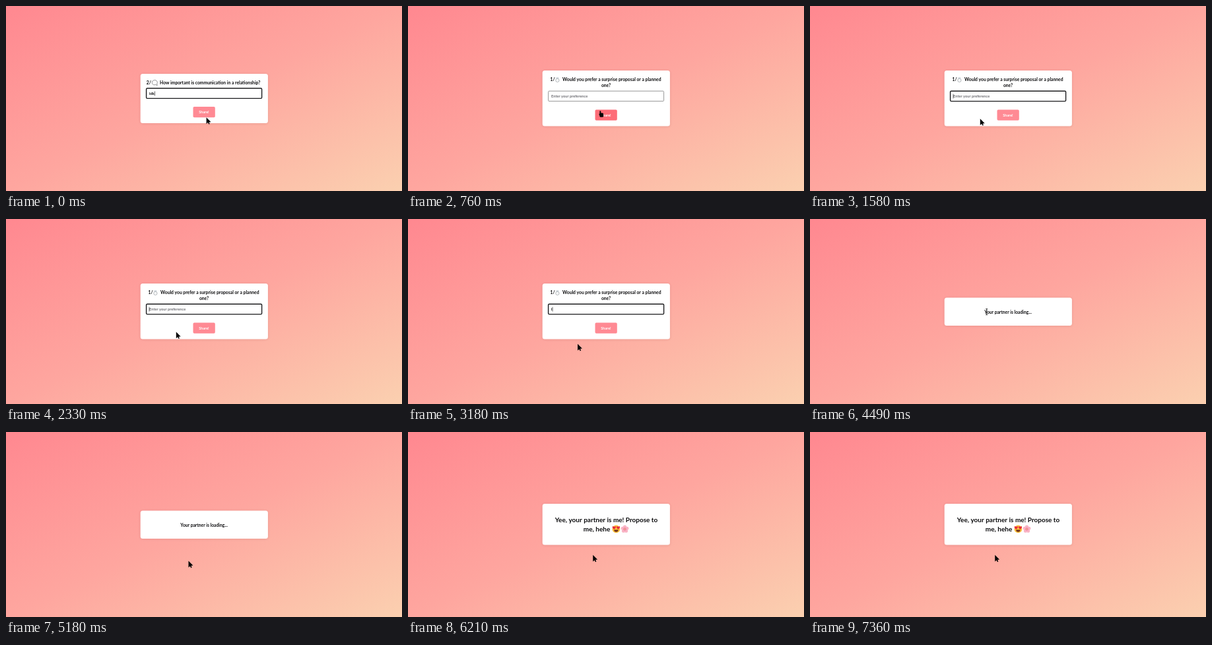
These frames come from a looping animation (600x281 px, 7.39 s). An HTML page with a canvas:

```html
<!DOCTYPE html>
<html lang="en">
<head>
<meta charset="utf-8">
<title>Partner quiz</title>
<style>
html, body { margin: 0; width: 100%; height: 100%; overflow: hidden; background: #ffa69f; }
canvas { display: block; width: 600px; height: 281px; }
</style>
</head>
<body>
<canvas id="stage"></canvas>
<script>
const W = 600, H = 281, LOOP = 7390;
const canvas = document.getElementById('stage');
const ctx = canvas.getContext('2d');
const scale = window.devicePixelRatio || 1;
canvas.width = W * scale;
canvas.height = H * scale;

const INK = '#0c0c0e';
const FIELD = { x: 212.6, w: 175 };
const BUTTON = { x: 283.5, w: 33.3 };

// Screens by start time
const screens = [
  { at: 0, top: 103, bottom: 178, draw: questionTwo, field: 125, button: 153 },
  { at: 400, top: 98, bottom: 182.5, draw: questionOne, field: 129.2, button: 157.6 },
  { at: 4220, top: 119.5, bottom: 162, draw: loading, text: [263, 136.5, 75, 9] },
  { at: 6150, top: 109, bottom: 171.6, draw: answer }
];

// Pointer stops: time, x, y
const stops = [
  [0, 303.6, 169.2], [60, 303.6, 169], [300, 292, 161], [760, 291.5, 159.6],
  [800, 291.5, 159.6], [1080, 256, 138], [1200, 256, 138], [1530, 257.8, 171.2],
  [2330, 257.8, 171.4], [2900, 257, 189.8], [3640, 257, 189.8], [4080, 290.6, 172.6],
  [4230, 290.6, 172.6], [4490, 267.7, 141], [4720, 267.7, 141], [5180, 276.5, 195.8],
  [5810, 276.5, 195.8], [5880, 280.2, 186.8], [LOOP, 280.2, 186.8]
];

function pointerAt(t) {
  const i = Math.max(1, stops.findIndex(s => s[0] > t));
  const [t0, x0, y0] = stops[i - 1], [t1, x1, y1] = stops[i];
  const p = (t - t0) / (t1 - t0), e = p * p * (3 - 2 * p);
  return { x: x0 + (x1 - x0) * e, y: y0 + (y1 - y0) * e };
}

const inside = (p, x, y, w, h) => p.x >= x && p.x <= x + w && p.y >= y && p.y <= y + h;

function box(x, y, w, h, r) {
  ctx.beginPath();
  ctx.roundRect(x, y, w, h, r);
}

function disc(x, y, rx, color, ry = rx) {
  ctx.fillStyle = color;
  ctx.beginPath();
  ctx.ellipse(x, y, rx, ry, 0, 0, Math.PI * 2);
  ctx.fill();
}

function label(str, x, y, size, align = 'center', color = INK) {
  ctx.font = `bold ${size}px Lato, "Open Sans", sans-serif`;
  ctx.textAlign = align;
  ctx.fillStyle = color;
  ctx.fillText(str, x, y);
  return ctx.measureText(str).width;
}

function backdrop() {
  // Gradient line perpendicular to the rising diagonal
  const k = W * H / (W * W + H * H), dx = H * k, dy = W * k;
  const g = ctx.createLinearGradient(W / 2 - dx, H / 2 - dy, W / 2 + dx, H / 2 + dy);
  g.addColorStop(0, '#ff8890');
  g.addColorStop(0.5, '#fea69f');
  g.addColorStop(1, '#fbd0b0');
  ctx.fillStyle = g;
  ctx.fillRect(0, 0, W, H);
}

function card(s) {
  ctx.save();
  ctx.shadowColor = 'rgba(120, 40, 40, 0.16)';
  ctx.shadowBlur = 4 * scale;
  ctx.shadowOffsetY = 0.6 * scale;
  ctx.fillStyle = '#fff';
  box(203.7, s.top, 193.2, s.bottom - s.top, 3.5);
  ctx.fill();
  ctx.restore();
}

function field(y, text, focused, caretOn) {
  box(FIELD.x, y, FIELD.w, 15.4, 1.4);
  ctx.fillStyle = '#fff';
  ctx.fill();
  ctx.lineWidth = focused ? 1.4 : 0.9;
  ctx.strokeStyle = focused ? '#1c1c1e' : '#8c8c8c';
  ctx.stroke();
  const shown = text || 'Enter your preference';
  const width = label(shown, 217, y + 9.8, 5.7, 'left', text ? INK : '#6f6f74');
  if (focused && caretOn) {
    ctx.fillStyle = INK;
    ctx.fillRect(text ? 217.3 + width : 216.7, y + 4.5, 0.6, 6.8);
  }
}

function button(y, hover) {
  ctx.fillStyle = hover ? '#fd6d78' : '#ff8a94';
  box(BUTTON.x, y, BUTTON.w, 16.2, 1.8);
  ctx.fill();
  label('Share!', 300, y + 10.1, 5.5, 'center', '#fff');
}

function bubble(x, y) {
  ctx.beginPath();
  ctx.ellipse(x, y, 4.1, 3.5, 0, 1.2, Math.PI * 2 + 0.55);
  ctx.lineTo(x + 4, y + 4.4);
  ctx.closePath();
  ctx.fillStyle = '#fff';
  ctx.fill();
  ctx.strokeStyle = '#4c4c50';
  ctx.lineWidth = 0.6;
  ctx.stroke();
}

function ring(x, y) {
  ctx.strokeStyle = '#a9adb2';
  ctx.lineWidth = 0.9;
  ctx.beginPath();
  ctx.arc(x, y + 1.2, 2.6, 0, Math.PI * 2);
  ctx.stroke();
  ctx.beginPath();
  ctx.moveTo(x - 1.7, y - 3.2);
  ctx.lineTo(x + 1.7, y - 3.2);
  ctx.lineTo(x + 2.1, y - 2.3);
  ctx.lineTo(x, y - 0.5);
  ctx.lineTo(x - 2.1, y - 2.3);
  ctx.closePath();
  ctx.fillStyle = '#c3ccd2';
  ctx.fill();
}

function heart(x, y, r) {
  ctx.fillStyle = '#e8283f';
  ctx.beginPath();
  ctx.moveTo(x, y + r);
  ctx.bezierCurveTo(x - r * 2.1, y - r * 0.4, x - r * 0.8, y - r * 1.7, x, y - r * 0.5);
  ctx.bezierCurveTo(x + r * 0.8, y - r * 1.7, x + r * 2.1, y - r * 0.4, x, y + r);
  ctx.fill();
}

function loveFace(x, y) {
  disc(x, y, 5.9, '#fdc23a');
  ctx.fillStyle = '#70331c';
  ctx.beginPath();
  ctx.arc(x, y + 1.2, 3.2, 0, Math.PI);
  ctx.fill();
  heart(x - 3.1, y - 1.9, 2.3);
  heart(x + 3.1, y - 1.9, 2.3);
}

function blossom(x, y) {
  for (let i = 0; i < 5; i++) {
    const a = -Math.PI / 2 + i * Math.PI * 0.4;
    disc(x + 3.4 * Math.cos(a), y + 3.4 * Math.sin(a), 2.6, '#f9b3c4');
  }
  disc(x, y, 2.2, '#ee7f9d');
  disc(x, y, 0.8, '#f6cf74');
}

function questionTwo(t, s, p) {
  label('2/', 212.8, 118.6, 6.75, 'left');
  bubble(225.2, 116.2);
  label('How important is communication in a relationship?', 309.2, 118.6, 6.75);
  field(s.field, 'idk', t < 330, true);
  button(s.button, p.onButton);
}

function questionOne(t, s, p) {
  label('1/', 215.6, 113.9, 6.75, 'left');
  ring(226.4, 111.7);
  label('Would you prefer a surprise proposal or a planned', 308.8, 113.9, 6.75);
  label('one?', 300, 123.1, 6.75);
  const keys = [3060, 3300, 3460].filter(k => t >= k);
  const focusAt = 1150;
  const since = t - (keys.length ? keys[keys.length - 1] : focusAt);
  field(s.field, 'idk'.slice(0, keys.length), t >= focusAt && t < 4090, since % 1000 < 500);
  button(s.button, p.onButton);
}

function loading() {
  label('Your partner is loading...', 300.2, 143.8, 6.7);
}

function answer() {
  label('Yee, your partner is me! Propose to', 300.5, 137, 10);
  label('me, hehe', 286, 150.6, 10);
  loveFace(315.4, 147.4);
  blossom(328.5, 147.4);
}

function shape(x, y, pts) {
  ctx.beginPath();
  for (const [dx, dy] of pts) ctx.lineTo(x + dx, y + dy);
  ctx.closePath();
  ctx.fillStyle = '#050505';
  ctx.fill();
}

function arrow(x, y) {
  shape(x, y, [[0, 0], [0, 9.9], [2.4, 7.9], [3.7, 10.6], [5.1, 9.9], [4, 7.3], [6.9, 7]]);
}

function hand(x, y) {
  ctx.fillStyle = '#050505';
  box(x - 1.1, y - 0.4, 1.9, 7, 0.9);
  ctx.fill();
  box(x - 1, y + 3, 5.6, 6.2, 1.6);
  ctx.fill();
  shape(x, y, [[-2.3, 4.3], [-1.3, 4], [0.2, 5.6], [0.4, 9], [-0.2, 8.7]]);
}

function beam(x, y) {
  ctx.strokeStyle = '#1a1a1a';
  ctx.lineWidth = 0.8;
  ctx.beginPath();
  ctx.moveTo(x, y - 4.5);
  ctx.lineTo(x, y + 4.5);
  for (const d of [-4.5, 4.5]) {
    ctx.moveTo(x - 1.5, y + d);
    ctx.lineTo(x + 1.5, y + d);
  }
  ctx.stroke();
}

function render(t) {
  ctx.setTransform(scale, 0, 0, scale, 0, 0);
  const s = screens.filter(k => t >= k.at).pop();
  const p = pointerAt(t);
  p.onButton = !!s.button && inside(p, BUTTON.x, s.button, BUTTON.w, 16.1);
  const onText = (s.field && inside(p, FIELD.x, s.field, FIELD.w, 15.4)) ||
    (s.text && inside(p, ...s.text));
  backdrop();
  card(s);
  s.draw(t, s, p);
  (p.onButton ? hand : onText ? beam : arrow)(p.x, p.y);
}

let start;
function tick(now) {
  if (start === undefined) start = now;
  render((now - start) % LOOP);
  requestAnimationFrame(tick);
}
requestAnimationFrame(tick);
</script>
</body>
</html>
```
